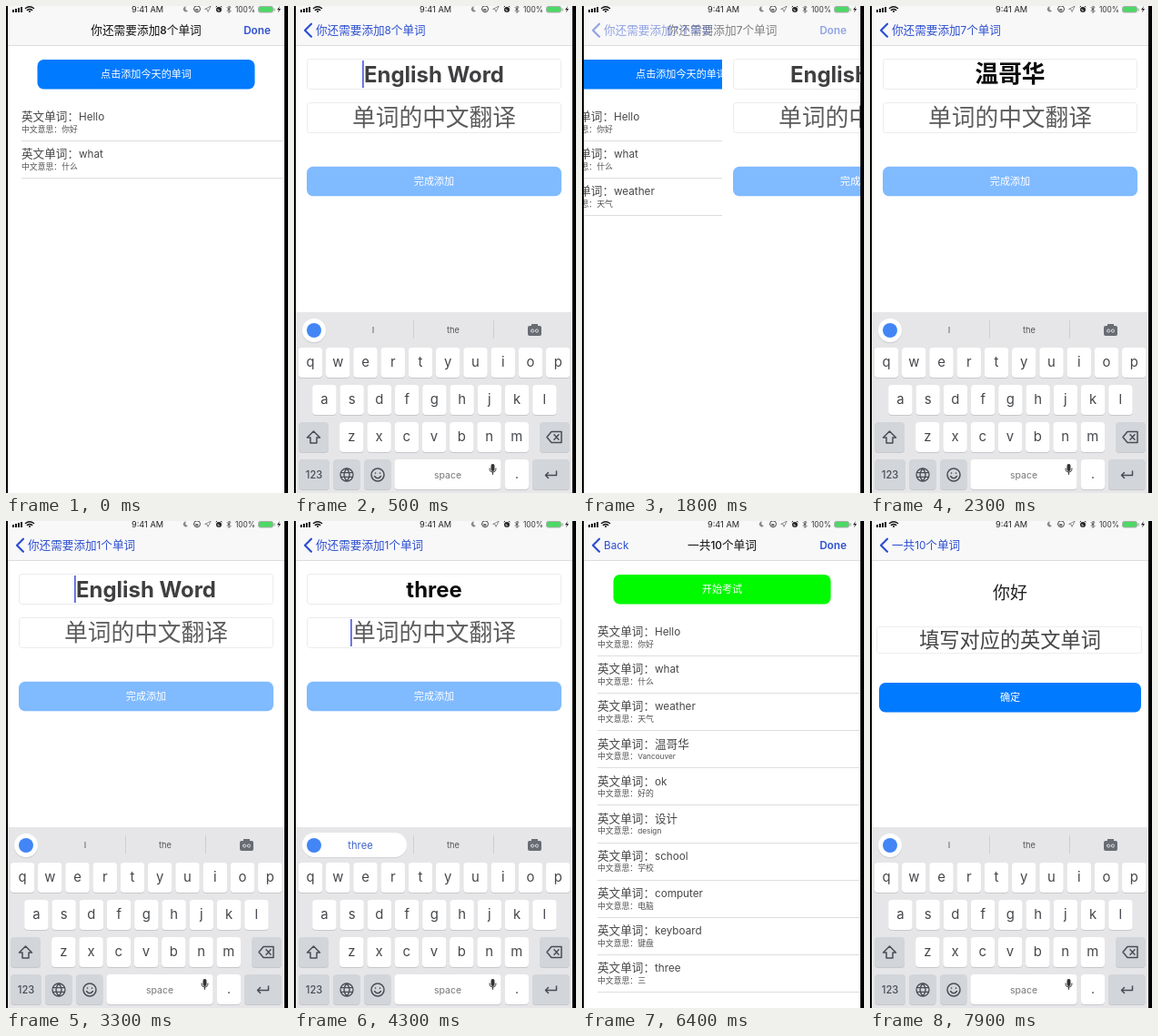
An HTML page with a canvas that plays this animation: 310 by 536 pixels, repeating every 8 s.

```html
<!DOCTYPE html>
<html lang="zh-CN">
<head>
<meta charset="utf-8">
<title>单词</title>
<style>
html, body { margin: 0; height: 100%; overflow: hidden; background: #000; }
canvas { display: block; width: 310px; height: 536px; }
</style>
</head>
<body>
<canvas id="stage"></canvas>
<script>
const LOOP = 8000, STEP = 100, NAV_Y = 26.4;
const BLUE = '#007aff', LINK = '#2c4fd0', INK = '#333', ICON = '#494d53';
const FACE = 'Inter, "Noto Sans CJK SC", "Noto Sans CJK", sans-serif';
const canvas = document.getElementById('stage');
const c = canvas.getContext('2d');
const ratio = window.devicePixelRatio || 1;
canvas.width = 310 * ratio;
canvas.height = 536 * ratio;

// ---------- drawing helpers ----------
function rect(x, y, w, h, color) {
  c.fillStyle = color;
  c.fillRect(x, y, w, h);
}

function box(x, y, w, h, r, fill, stroke) {
  c.beginPath();
  c.roundRect(x, y, w, h, r);
  if (fill) { c.fillStyle = fill; c.fill(); }
  if (stroke) { c.strokeStyle = stroke; c.lineWidth = 1; c.stroke(); }
}

function dot(x, y, r, color) {
  c.beginPath();
  c.arc(x, y, r, 0, 7);
  c.fillStyle = color;
  c.fill();
}

function line(d, x, y, color = ICON, width = 1.5, fill = false) {
  const path = new Path2D(d);
  c.save();
  c.translate(x, y);
  c.lineWidth = width;
  c.lineCap = c.lineJoin = 'round';
  c.strokeStyle = c.fillStyle = color;
  if (fill) c.fill(path); else c.stroke(path);
  c.restore();
}

// Latin runs are set slightly smaller than Chinese runs. Returns [left, right].
function text(s, x, y, size, color = INK, weight = 400, align = 'center') {
  const runs = (s.match(/[\x00-\xff]+|[^\x00-\xff]+/g) || []).map(run => {
    const font = `${weight} ${run.charCodeAt(0) < 256 ? size * .93 : size}px ${FACE}`;
    c.font = font;
    return { run, font, width: c.measureText(run).width };
  });
  const total = runs.reduce((sum, r) => sum + r.width, 0);
  const left = align === 'center' ? x - total / 2 : x;
  let pen = left;
  c.fillStyle = color;
  for (const r of runs) {
    c.font = r.font;
    c.fillText(r.run, pen, y + size * .36);
    pen += r.width;
  }
  return [left, pen];
}

function button(x, y, w, label, color) {
  box(x, y, w, 32.5, 7, color);
  text(label, x + w / 2, y + 16, 11.1, '#fff', 500);
}

// ---------- bars ----------
function statusBar() {
  for (let i = 0; i < 4; i++) rect(7 + i * 3, 4 - i, 2, 3 + i, '#111');
  line('M-4.5-2.5Q0-6 4.5-2.5M-2.7-.4Q0-2.5 2.7-.4', 26, 5, '#111', 1.4);
  dot(26, 6, 1.1, '#111');
  text('9:41 AM', 155.5, 3.6, 9.9, '#222');
  line('M1-3A3 3 0 1 0 3 2A3 3 0 0 1 1-3Z', 197, 3.5, '#888', 1, true);
  line('M-3.5 0A3.5 3.5 0 1 0 3.5 0A3.5 3.5 0 1 0-3.5 0M-1 .5H1V1.5H-1Z', 210, 3.3, '#444', 1);
  line('M3-3L0 3L-.5 .5L-3 0Z', 222, 3.5, '#777', .8);
  dot(234, 4, 3, '#222');
  line('M-3-2L-1.5-3.5M3-2L1.5-3.5', 234, 3, '#222', 1);
  line('M0 2V0H-1.5', 234, 4, '#fff', .7);
  line('M-2-2L2 2L0 4V-4L2-2L-2 2', 245, 3.5, '#333', .8);
  text('100%', 263, 3.6, 9, '#333');
  box(277.5, .5, 16, 6.5, 2, '#4cd964', '#aaa');
  rect(294.5, 2.5, 1.3, 3, '#aaa');
  line('M1-3.5L-2 .8H0L-1 4L2-.6H0Z', 300, 3.5, '#222', .5, true);
}

function backLink(label) {
  line('M7-7L0 0L7 7', 12, NAV_Y + .3, LINK, 2.2);
  text(label, 24, NAV_Y, 12.6, LINK, 400, 'left');
}

const remaining = n => n > 0 ? `你还需要添加${n}个单词` : '一共10个单词';

// ---------- keyboards ----------
function key(x, y, w, fill = '#fff') {
  box(x, y + 1, w, 33, 4, '#c6c8cb');
  box(x, y, w, 33, 4, fill);
}

function mic(x, y) {
  box(x - 2, y - 6, 4, 8, 2, '#333');
  line('M-3.5-1Q-3.5 3 0 3Q3.5 3 3.5-1M0 3V5.5', x, y, '#333', 1);
}

const erase = (x, y) => line('M-8 0L-3-6H8V6H-3ZM0-2.7L5 2.7M5-2.7L0 2.7', x, y);

// rise: 0 hidden to 1 fully shown
const qwerty = (word = '', pressed = '', rise = 1) => () => {
  c.save();
  c.translate(0, (1 - rise) * 199);
  rect(2, 337, 304, 200, '#e6e6e8');
  if (word) {
    box(9, 344, 115, 27, 13.5, '#d2d4d7');
    box(9, 343, 115, 27, 13.5, '#fff');
    text(word, 73, 357, 12, '#3d63c8');
  } else {
    dot(22, 358, 13.3, '#d0d2d5');
    dot(22, 357, 13, '#fff');
    text('I', 87, 356, 10, '#555');
  }
  dot(22, 357, 8, '#4285f4');
  text('the', 175, 356, 10, '#555');
  rect(131, 346, 1, 20, '#cdcfd2');
  rect(219, 346, 1, 20, '#cdcfd2');
  box(257, 352, 15, 11, 2, '#686c73');
  rect(261, 350, 7, 3, '#686c73');
  line('M-4 0A1.6 1.6 0 1 0-.8 0A1.6 1.6 0 1 0-4 0M.8 0A1.6 1.6 0 1 0 4 0A1.6 1.6 0 1 0 .8 0', 264.5, 357.5, '#e6e6e8', .9);

  ['qwertyuiop', 'asdfghjkl', 'zxcvbnm'].forEach((row, r) => {
    [...row].forEach((ch, i) => {
      const x = [18, 33.4, 63.3][r] + i * 30.25, y = 376 + r * 41;
      key(x - 13.2, y, 26.4, ch === pressed ? '#d2d4d8' : '#fff');
      text(ch, x, y + 15.5, 16, '#44474b');
    });
  });

  const grey = '#d2d5d9';
  key(5, 458, 33, grey);
  line('M0-7L7 0H3.5V6H-3.5V0H-7Z', 21.5, 475);
  key(270, 458, 33, grey);
  erase(286, 474.5);
  key(5, 499, 34, grey);
  text('123', 22, 516, 12, ICON, 500);
  key(43, 499, 29.5, grey);
  line('M-7 0A7 7 0 1 0 7 0A7 7 0 1 0-7 0M0-7Q-6 0 0 7Q6 0 0-7M-6.5-2.3H6.5M-6.5 2.3H6.5', 58, 516, ICON, 1.3);
  key(77, 499, 29.5, grey);
  line('M-7 0A7 7 0 1 0 7 0A7 7 0 1 0-7 0M-3.5 1.5Q0 6 3.5 1.5M-2.5-2V-1.8M2.5-2V-1.8', 92, 516);
  key(110.5, 499, 117);
  text('space', 169, 516, 11.3, '#777');
  mic(218.5, 510);
  key(232, 499, 26);
  text('.', 245, 515, 15, '#444');
  key(262, 499, 41, grey);
  line('M6-3V1.5H-6M-3-1.5L-6 1.5L-3 4.5', 282.5, 515);
  c.restore();
};

const ninekey = (code = '', side = '，。？！', words = '', pressed = '') => () => {
  rect(2, 324, 304, 212, '#e6e6e8');
  text(code, 10, 334.5, 10.4, '#555', 400, 'left');
  c.save();
  c.beginPath();
  c.rect(2, 345, 271, 30);
  c.clip();
  let x = 10;
  for (const word of words.split(' ')) x = text(word, x, 360, 14.2, '#3c3c3c', 400, 'left')[1] + 17;
  c.restore();
  if (words) line('M-4-2L0 2L4-2', 289, 360, '#444', 1.6);

  [...side].forEach((s, i) => text(s, 32.5, 396 + i * 40, 11.5, '#555'));
  rect(59, 378, 2, 88, '#cfd1d4');
  const labels = ["'词", 'abc', 'def', 'ghi', 'jkl', 'mno', 'pqrs', 'tuv', 'wxyz', '， 。?'];
  labels.forEach((label, i) => {
    const kx = 63 + i % 3 * 61, ky = 376 + Math.floor(i / 3) * 40;
    rect(kx, ky, 60.3, 39.3, label === pressed ? '#d2d2d3' : '#fff');
    text(label, kx + 30, ky + 20, 14, '#444');
  });
  rect(124, 496, 121.3, 40, '#fff');
  text('空格', 184.5, 516, 11.3, '#444');
  mic(236.5, 508);
  rect(246, 376, 60, 160, '#e0e1e3');
  for (const y of [415, 455]) rect(246, y, 60, 1, '#e8e8ea');
  erase(275, 396);
  text('重输', 275.5, 436, 11.3, '#333', 500);
  text('确认', 275.5, 496, 11.3, '#333', 500);
};

// ---------- screens: each has a nav and a body ----------
const entries = [
  ['Hello', '你好'], ['what', '什么'], ['weather', '天气'], ['温哥华', 'Vancouver'], ['ok', '好的'],
  ['设计', 'design'], ['school', '学校'], ['computer', '电脑'], ['keyboard', '键盘'], ['three', '三']
];

const list = (n, pressed) => ({
  nav() {
    if (n === 10) backLink('Back');
    text(remaining(10 - n), 154, NAV_Y, 12.7, '#111', 500);
    text('Done', 276, NAV_Y, 12.6, LINK, 600);
  },
  body() {
    c.globalAlpha = pressed ? .4 : 1;
    if (n === 10) button(34.5, 59, 239, '开始考试', '#00fa00');
    else button(34.5, 59, 239, '点击添加今天的单词', BLUE);
    c.globalAlpha = 1;
    entries.slice(0, n).forEach(([word, meaning], i) => {
      const y = 121.7 + i * 41.1;
      text('英文单词：' + word, 17, y, 12.6, '#484848', 400, 'left');
      text('中文意思：' + meaning, 17, y + 14, 8.86, '#505050', 400, 'left');
      rect(17, Math.round(y + 26.3), 288, 1, '#dedee0');
    });
  }
});

function field(y, value, hint, weight, hintColor, focused) {
  box(14.5, y + .5, 279, 33, 3, '#fff', '#ebebed');
  const [left, right] = text(value || hint, 154, y + 16.7, 25.7, value ? '#0c0c0c' : hintColor, weight);
  if (focused) rect(value ? right + 1 : left - 2, y + 2, 1.6, 30, '#4b57d6');
}

// focus: 0 none, 1 word, 2 translation
const form = (left, word, meaning, focus, keyboard, pressed) => ({
  nav: () => backLink(remaining(left)),
  body() {
    field(58, word, 'English Word', 700, '#3f3f41', focus === 1);
    field(106, meaning, '单词的中文翻译', 300, '#5c5c5e', focus === 2);
    button(14, 176.7, 280, '完成添加', word && meaning && !pressed ? BLUE : '#80baff');
    if (keyboard) keyboard();
  }
});

const quiz = keyboard => ({
  nav: () => backLink(remaining(0)),
  body() {
    text('你好', 154, 79, 19, '#222');
    box(7.5, 116.5, 291, 29, 3, '#fff', '#eeeef0');
    text('填写对应的英文单词', 154, 131, 22.2, '#444446');
    button(10, 178, 288, '确定', BLUE);
    if (keyboard) keyboard();
  }
});

// p: how far the upper screen has come in from the right
const slide = (under, over, p) => ({ under, over, p });

function layer(screen, x) {
  c.save();
  c.translate(x, 0);
  rect(2, 0, 304, 536, '#fff');
  screen.body();
  c.restore();
}

function draw({ under, over, p }) {
  c.setTransform(ratio, 0, 0, ratio, 0, 0);
  rect(0, 0, 310, 536, '#000');
  c.save();
  c.beginPath();
  c.rect(2, 0, 304, 536);
  c.clip();
  if (under) layer(under, -90 * p);
  layer(over, 304 * (1 - p));
  rect(2, 0, 304, 43, '#f8f8f9');
  rect(2, 43, 304, 1, '#dcdcde');
  statusBar();
  if (under) {
    c.globalAlpha = 1 - p;
    under.nav();
  }
  c.globalAlpha = p;
  over.nav();
  c.restore();
}

// ---------- timeline ----------
const steps = [];
const at = (time, screen) => steps.push([time, screen.over ? screen : slide(null, screen, 1)]);

// Types a word, size letters at a time, one step each
function typing(start, word, size, make) {
  for (let n = size, t = start; n - size < word.length; n += size, t += STEP) {
    const part = word.slice(0, n);
    at(t, make(part, qwerty(part, part.slice(-1))));
  }
}

at(0, list(2));
at(100, list(2, true));
at(200, slide(list(2), form(8, '', '', 0), .45));
at(300, slide(list(2), form(8, '', '', 0), .88));
at(400, form(8, '', '', 1, qwerty('', '', .5)));
at(500, form(8, '', '', 1, qwerty()));
typing(600, 'weather', 1, (word, keys) => form(8, word, '', 1, keys));
at(1300, form(8, 'weather', '', 2, qwerty('weather')));
at(1400, form(8, 'weather', '', 2, ninekey('tian', ['tian', 'vian', 't', 'u'], '天气 天 填 田 甜 添 天天 天下')));
at(1500, form(8, 'weather', '天气', 2, ninekey()));
at(1600, slide(list(3), form(8, 'weather', '天气', 0, ninekey()), .5));
at(1700, list(3));
at(1800, slide(list(3), form(7, '', '', 0), .5));
at(1900, form(7, '', '', 1, ninekey()));
at(2000, form(7, '', '', 1, ninekey('wen', ['wen', 'yen', 'w', 'x'], '问 文 温 闻 稳 吻 温度 文化')));
at(2100, form(7, '', '', 1, ninekey("wen'ge'hua", ['wen', 'w', 'x', 'y'], '温哥华 文革 问 文 温 闻')));
at(2200, form(7, '温哥华', '', 1, ninekey()));
at(2300, form(7, '温哥华', '', 0, qwerty()));
typing(2400, 'Vancouver', 3, (word, keys) => form(7, '温哥华', word, 2, keys));
at(2700, form(7, '温哥华', 'Vancouver', 2, qwerty('Vancouver')));
at(2900, list(9));
at(3000, slide(list(9), form(1, '', '', 0, qwerty('', '', .5)), .6));
at(3100, form(1, '', '', 0, qwerty()));
at(3300, form(1, '', '', 1, qwerty()));
typing(3500, 'three', 1, (word, keys) => form(1, word, '', 1, keys));
at(4000, form(1, 'three', '', 1, qwerty('three')));
at(4200, form(1, 'three', '', 2, qwerty('three')));
at(4400, form(1, 'three', '', 2, qwerty()));
at(4500, form(1, 'three', '', 2, ninekey()));
at(4700, form(1, 'three', '', 0, ninekey()));

const pa = ['pa', ['pa', 'sa', 'p', 'q'], '怕 撒 爬 日报 上班 萨 市场 门'];
at(4900, form(1, 'three', '', 0, ninekey('p', ['p', 'q', 'r', 's'], '品 去 人 是 请 让 上 说 平', 'pqrs')));
at(5000, form(1, 'three', '', 0, ninekey(...pa, 'abc')));
at(5100, form(1, 'three', '', 0, ninekey(...pa, 'mno')));
at(5200, form(1, 'three', '', 0, ninekey('san', ['san', 'pan', 'ran', 'p'], '三 散 伞 盘 判 然 盼 潘 山')));
at(5300, form(1, 'three', '三', 2, ninekey()));
at(5500, form(1, 'three', '三', 2, ninekey(), true));
at(5600, slide(list(10), form(1, 'three', '三', 0, ninekey()), .7));
at(5700, slide(list(10), form(1, 'three', '三', 0, ninekey()), .25));
at(5800, list(10));
at(6900, list(10, true));
at(7000, slide(list(10), quiz(), .3));
at(7100, slide(list(10), quiz(), .7));
at(7200, slide(list(10), quiz(), .93));
at(7300, quiz());
at(7700, quiz(qwerty('', '', .35)));
at(7800, quiz(qwerty('', '', .8)));
at(7900, quiz(qwerty()));

const origin = performance.now();
function frame() {
  const t = Math.floor((performance.now() - origin) % LOOP / STEP) * STEP;
  draw(steps.findLast(([time]) => time <= t)[1]);
  requestAnimationFrame(frame);
}
frame();
</script>
</body>
</html>
```
